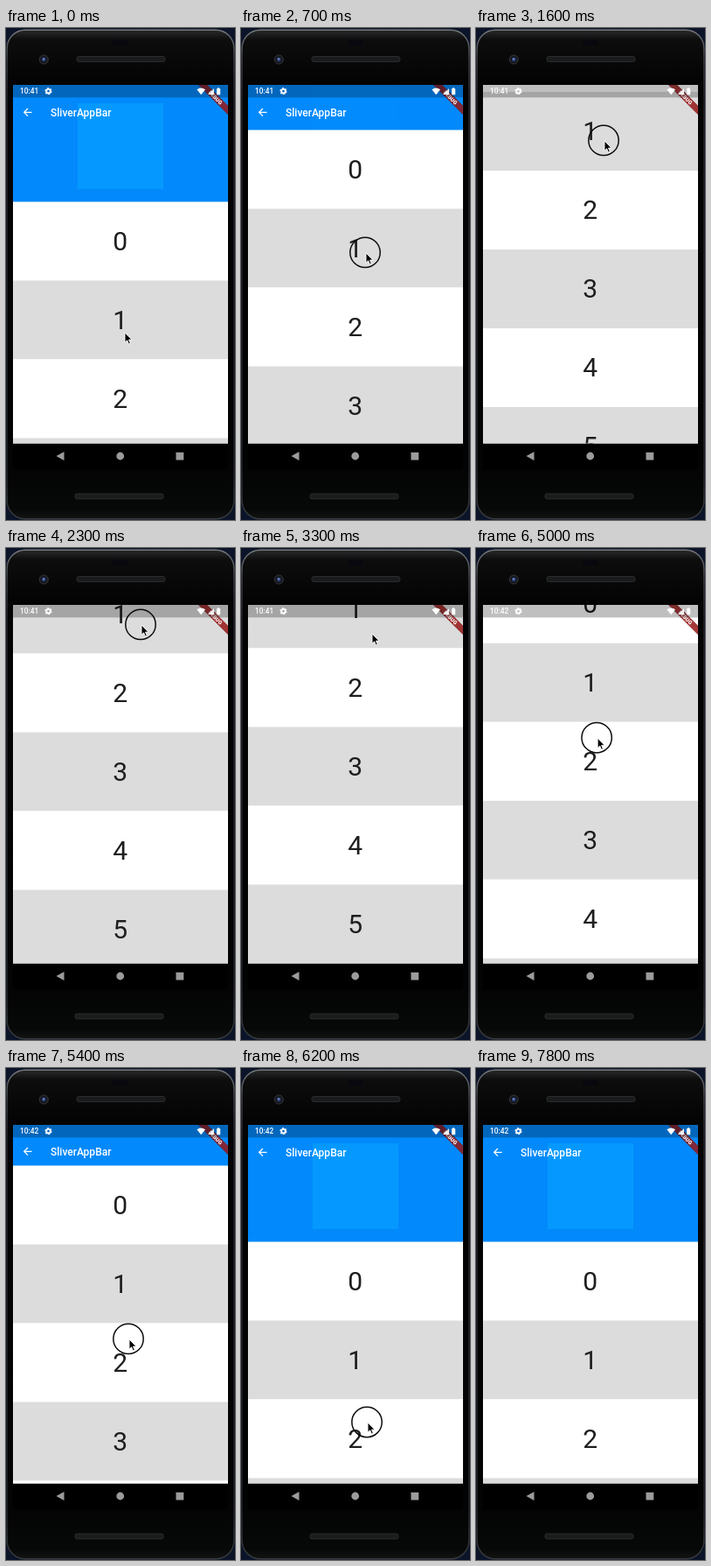
Write an HTML page that moves like this. It is 262x562 px and loops after 7900 ms.

```html
<!DOCTYPE html>
<html lang="en">
<head>
<meta charset="utf-8">
<title>Collapsing app bar</title>
<style>
  html, body { margin: 0; width: 100%; height: 100%; overflow: hidden; background: #0b1428; }
  svg { display: block; width: 262px; height: 562px; }
  text { font-family: Roboto, Arial, sans-serif; }
  .digit { font-size: 30px; fill: #1e1e1e; text-anchor: middle; }
  .title { font-size: 12px; font-weight: 500; fill: #fff; }
  .clock { font-size: 8.4px; font-weight: 500; fill: #fff; }
  .debug { font-size: 6.1px; font-weight: 900; fill: #fff; text-anchor: middle; }
</style>
</head>
<body>
<svg viewBox="0 0 262 562">
  <defs>
    <linearGradient id="shell" x1="0" y1="0" x2="0" y2="1">
      <stop offset="0" stop-color="#2a2b2c"/>
      <stop offset=".02" stop-color="#0d0d0e"/>
      <stop offset=".1" stop-color="#040404"/>
      <stop offset=".88" stop-color="#030303"/>
      <stop offset=".98" stop-color="#070808"/>
      <stop offset="1" stop-color="#121313"/>
    </linearGradient>
    <linearGradient id="rim" x1="0" y1="0" x2="0" y2="1">
      <stop offset="0" stop-color="#77797b"/>
      <stop offset=".06" stop-color="#3c3d3f"/>
      <stop offset=".14" stop-color="#202122"/>
      <stop offset=".9" stop-color="#202122"/>
      <stop offset="1" stop-color="#3c3d3f"/>
    </linearGradient>
    <clipPath id="view"><rect x="8" y="65" width="246" height="409.5"/></clipPath>
  </defs>

  <!-- phone body -->
  <rect x="1.2" y="2.2" width="259.6" height="558.6" rx="21" fill="url(#shell)" stroke="url(#rim)" stroke-width="1.4"/>
  <rect x="122" y="14" width="17" height="6" rx="2" fill="#08080e"/>
  <g fill="#1a1b1c" stroke="#333435" stroke-width=".8">
    <rect x="81" y="32.5" width="101" height="6" rx="2.4"/>
    <rect x="79" y="532" width="101" height="6" rx="2.4"/>
  </g>
  <circle cx="43.3" cy="36" r="5" fill="#15171c" stroke="#37393d"/>
  <circle cx="43.3" cy="36" r="2.4" fill="#2b3c74"/>
  <circle cx="43" cy="35.6" r="1" fill="#8ba2de"/>
  <rect x="8" y="474.5" width="246" height="29.5" fill="#000"/>
  <g fill="#9b9b9b">
    <path d="M57.5 489 L66.5 484 V494 Z"/>
    <circle cx="130.7" cy="489" r="4.4"/>
    <rect x="194.5" y="484.7" width="8.8" height="8.8" rx=".6"/>
  </g>

  <g clip-path="url(#view)">
    <rect x="8" y="65" width="246" height="410" fill="#fff"/>
    <g id="bar">
      <rect x="8" y="65" width="246" height="134" fill="#0289fb"/>
      <rect id="mark" x="82" y="86" width="98" height="98" fill="#0599ff"/>
      <path d="M29.6 96.3 H20.8 M25 92 L20.7 96.3 L25 100.6" fill="none" stroke="#fff" stroke-width="1.25"/>
      <text class="title" x="51" y="100.5">SliverAppBar</text>
    </g>
    <g id="rows"></g>
    <g transform="translate(254 65) rotate(45)">
      <rect x="-30" y="16.8" width="60" height="7.2" fill="#000" opacity=".5"/>
      <rect x="-30" y="16.8" width="60" height="7.2" fill="#b71c1c" opacity=".7"/>
      <text class="debug" x="0" y="22.6">DEBUG</text>
    </g>

    <!-- status bar -->
    <rect x="8" y="65" width="246" height="14.4" opacity=".25"/>
    <text class="clock" id="clock" x="16" y="75.2">10:41</text>
    <circle cx="48.5" cy="72.2" r="2.3" fill="none" stroke="#fff" stroke-width="1.9"/>
    <circle cx="48.5" cy="72.2" r="3.5" fill="none" stroke="#fff" stroke-width="1.2" stroke-dasharray="1.83 1.83"/>
    <g fill="#fff">
      <path d="M218.4 70.2 Q223.2 66.6 228 70.2 L223.2 76.2 Z"/>
      <path d="M231 76 L238 69 V76 Z" opacity=".9"/>
      <path d="M241 69.2 H242.2 V68.3 H244 V69.2 H245.2 V76.2 H241 Z"/>
    </g>
  </g>

  <g id="pointer">
    <circle id="ring" cx="-1" cy="-.6" r="17.2" fill="none" stroke="#0c0c0c" stroke-width="1.5"/>
    <path d="M0 0 V11.2 L2.6 8.8 L4.4 13 L6.3 12.2 L4.5 8.1 H8 Z" fill="#000" stroke="#fff" stroke-width=".9"/>
  </g>
</svg>

<script>
const LOOP = 7900, STEP = 100;
const LIST_TOP = 198.5, ROW = 90, COLLAPSE = 86, FADE_START = 0.611;

// time, pointer x, pointer y, scroll offset
const track = [
  [0, 136, 348, 0],
  [200, 137, 342, 0],
  [700, 143, 257, 82],
  [1600, 147, 129, 215.5],
  [2300, 155, 88, 258],
  [2600, 156, 82, 264],
  [3300, 150, 98, 264],
  [4200, 136, 126, 264],
  [4500, 137, 131, 262.5],
  [5400, 141, 310, 87],
  [6000, 144, 400, 0],
  [6300, 146, 408, 0],
  [6900, 272, 470, 0],
  [7900, 272, 470, 0]
];
const presses = [[200, 2600], [4200, 6300]];
const POINTER_GONE = 6900, MINUTE_TURN = 3400;

const $ = id => document.getElementById(id);
const clamp = v => Math.max(0, Math.min(1, v));

function slope(i, c) {
  const rise = k => (track[k + 1][c] - track[k][c]) / (track[k + 1][0] - track[k][0]);
  if (i === 0 || i === track.length - 1) return 0;
  const a = rise(i - 1), b = rise(i);
  return a * b > 0 ? 2 * a * b / (a + b) : 0;
}

// Hermite curve that never overshoots its points
function sample(t, c) {
  let i = 0;
  while (i < track.length - 2 && t >= track[i + 1][0]) i++;
  const p = track[i], q = track[i + 1], h = q[0] - p[0], u = (t - p[0]) / h;
  const v = u * u * (3 - 2 * u);
  return p[c] * (1 - v) + q[c] * v
    + h * u * (1 - u) * ((1 - u) * slope(i, c) - u * slope(i + 1, c));
}

function add(parent, name, attrs, label = '') {
  const el = document.createElementNS('http://www.w3.org/2000/svg', name);
  for (const key in attrs) el.setAttribute(key, attrs[key]);
  el.textContent = label;
  parent.append(el);
}

for (let i = 0; i < 8; i++) {
  const y = LIST_TOP + i * ROW;
  add($('rows'), 'rect', { x: 8, y, width: 246, height: ROW, fill: i % 2 ? '#dcdcdc' : '#fff' });
  add($('rows'), 'text', { class: 'digit', x: 130.8, y: y + 55.3 }, i);
}

const move = (id, x, y) => $(id).setAttribute('transform', `translate(${x} ${y})`);

function draw(t) {
  const scroll = sample(t, 3), fold = clamp(scroll / COLLAPSE);
  move('rows', 0, -scroll);
  move('bar', 0, Math.min(0, COLLAPSE - scroll));
  move('mark', 0, -fold * COLLAPSE / 4);
  $('mark').setAttribute('opacity', 1 - clamp((fold - FADE_START) / (1 - FADE_START)));
  move('pointer', sample(t, 1), sample(t, 2));
  $('pointer').setAttribute('visibility', t < POINTER_GONE ? 'visible' : 'hidden');
  $('ring').setAttribute('opacity', presses.some(([a, b]) => t >= a && t < b) ? 1 : 0);
  $('clock').textContent = t < MINUTE_TURN ? '10:41' : '10:42';
}

const start = performance.now();
function tick() {
  const t = (performance.now() - start) % LOOP;
  draw(Math.floor(t / STEP) * STEP);
  requestAnimationFrame(tick);
}
tick();
</script>
</body>
</html>
```
